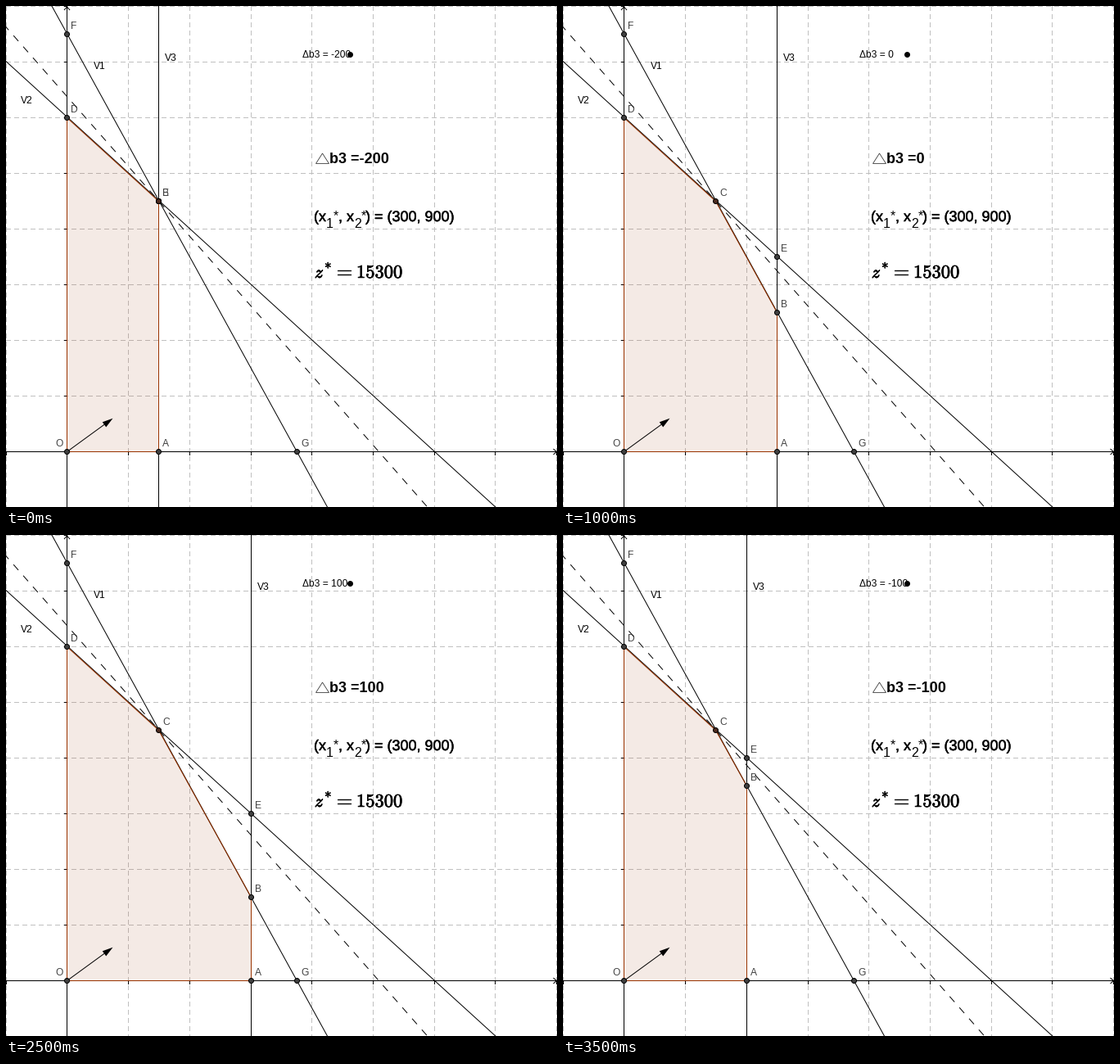
Write a matplotlib script that moves like this. It is 673x612 px and loops after 4000 ms.

```python
import math

import matplotlib.pyplot as plt
from matplotlib.animation import FuncAnimation
from matplotlib.patches import Circle, Polygon
from matplotlib.patheffects import withStroke

W, H, DPI = 673, 612, 64
PT = 72 / DPI  # points per pixel
BROWN, GREY, DOT = "#993300", "#c0c0c0", "#404040"
plt.rcParams["font.family"] = "Liberation Sans"
plt.rcParams["mathtext.fontset"] = "cm"

fig = plt.figure(figsize=(W / DPI, H / DPI), dpi=DPI, facecolor="white")
ax = fig.add_axes([0, 0, 1, 1])
ax.set_xlim(0, W)
ax.set_ylim(H, 0)
ax.axis("off")


def px(x, y):
    """Plane coordinates to pixel centres on the stage."""
    return math.floor(74.8 + 0.3737 * x) + 0.5, 544.5 - 0.34 * y


def line(points, color="black", width=1.0, z=3, **kw):
    # Snapping would push half-pixel coordinates to the next pixel.
    xs, ys = zip(*points)
    return ax.plot(xs, ys, color=color, lw=width * PT, zorder=z, snap=False,
                   solid_capstyle="butt", dash_capstyle="butt", **kw)[0]


def text(x, y, s, size=12, color="black", stroke=0, **kw):
    t = ax.text(x, y, s, fontsize=size * PT, color=color, zorder=8,
                va="baseline", **kw)
    if stroke:
        t.set_path_effects([withStroke(linewidth=stroke * PT,
                                       foreground=color)])
    return t


def dot(center, fill=DOT):
    return ax.add_patch(Circle(center, 3, fc=fill, ec="black", lw=PT,
                               zorder=6))


class Vertex:
    """A labelled point of the plane that can be moved."""

    def __init__(self, name, x=0, y=0, fill=DOT):
        self.mark = dot((0, 0), fill)
        self.tag = text(0, 0, name, color=DOT)
        self.move(x, y)

    def move(self, x, y):
        u, v = px(x, y)
        self.mark.set_center((u, v))
        self.tag.set_position((u + 4.5, v - 6.5))


def draw_grid():
    dash = (0, (6, 4))
    for k in range(-1, 9):
        x, _ = px(200 * k, 0)
        line([(x, 0), (x, H)], GREY, z=1, ls=dash)
        line([(x, 545), (x, 549)])
    for k in range(0, 9):
        _, y = px(0, 200 * k)
        line([(0, y), (W, y)], GREY, z=1, ls=dash)
        line([(71, y), (74, y)])


def draw_axes():
    line([(74.5, 0), (74.5, H)])
    line([(0, 544.5), (W, 544.5)])
    line([(71, 5), (74.5, 1), (78, 5)])
    line([(668.5, 541), (672.5, 544.5), (668.5, 548)])


def draw_constraints():
    # Each line runs a little past the stage, between whole pixels.
    line([(53.5, -4.5), (395.5, 617.5)])
    line([(-4.5, 63.5), (678.5, 685.5)])
    slope = 622 / 546
    line([(-1, -4.5 + 25.5 * slope), (519.5, 617.5)], ls=(2.6, (9, 9)))
    text(107, 77, "V1")
    text(18, 119, "V2")


def draw_vector():
    tip, start = px(150, 120), px(0, 0)
    angle = math.atan2(tip[1] - start[1], tip[0] - start[0])
    c, s = math.cos(angle), math.sin(angle)
    base = tip[0] - 13 * c, tip[1] - 13 * s
    line([start, base], z=5)
    ax.add_patch(Polygon([tip, (base[0] - 3.8 * s, base[1] + 3.8 * c),
                          (base[0] + 3.8 * s, base[1] - 3.8 * c)],
                         fc="black", ec="none", zorder=5))


def draw_results():
    ax.add_patch(Polygon([(378.5, 192.5), (394.5, 192.5), (386.5, 180)],
                         fill=False, ec="#333333", lw=0.8 * PT, zorder=8))
    for x, s in [(376, "(x"), (406, ", x"), (439, ") = (300, 900)")]:
        text(x, 263, s, 18, stroke=0.5)
    for x, s in [(391, "1"), (425, "2")]:
        text(x, 271, s, 16)
        text(x + 9, 261, "*", 16)
    text(377, 332, "$z$", 21, stroke=0.9)
    text(389, 321, r"$\ast$", 17, stroke=0.6)
    for y in (323.5, 328.5):
        line([(405, y), (422, y)], width=1.4, z=8)
    text(428, 332, r"$\mathbf{15300}$", 22.5, stroke=0.7)


draw_grid()
draw_axes()
draw_constraints()
draw_vector()
draw_results()

wall = line([(0, 0), (0, H)])
wall_tag = text(0, 67, "V3")
region = ax.add_patch(Polygon([(0, 0)] * 3, fc=BROWN, alpha=0.1, ec="none",
                              zorder=2))
border = line([(0, 0)], BROWN, z=4)

Vertex("F", 0, 1500)
Vertex("D", 0, 1200)
Vertex("G", 750, 0)
dot(px(0, 0))
text(60, 538, "O", color=DOT)
foot, low, high = Vertex("A"), Vertex("B"), Vertex("E")
corner = Vertex("C", 300, 900, "#4d2b20")

slider = text(362, 63, "")
ax.add_patch(Circle((420.5, 59.5), 3.5, fc="black", ec="none", zorder=6))
shift_text = text(395, 192, "", 18, weight="bold")


def update(i):
    shift = 200 - 100 * abs(i - 4)
    limit = 500 + shift
    x, _ = px(limit, 0)
    wall.set_xdata([x, x])
    wall_tag.set_x(x + 7.5)

    foot.move(limit, 0)
    low.move(limit, 1500 - 2 * limit)
    high.move(limit, 1200 - limit)
    corner.tag.set_visible(limit > 300)

    a, b = px(limit, 0), px(limit, 1500 - 2 * limit)
    path = [a, px(0, 0), px(0, 1200), px(300, 900), b]
    region.set_xy(path)
    border.set_data(*zip(*path, a))

    slider.set_text(f"Δb3 = {shift}")
    shift_text.set_text(f"b3 ={shift}")
    return []


anim = FuncAnimation(fig, update, frames=8, interval=500, repeat=True,
                     repeat_delay=0, blit=False)
plt.show()
```
